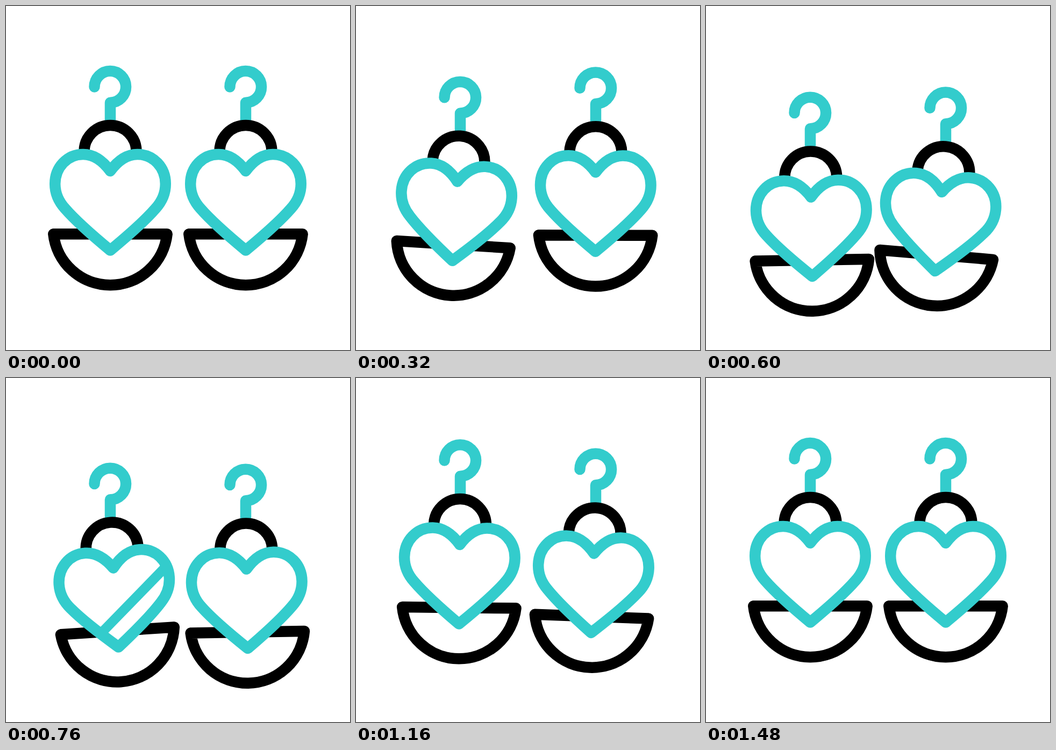
An HTML page that plays this animation: 640x640 px, repeating every 1.6 s.

```html
<!DOCTYPE html>
<html lang="en">
<head>
<meta charset="utf-8">
<title>Swinging earrings</title>
<style>
  html, body { margin: 0; height: 100%; overflow: hidden; background: #fff; }
  svg { display: block; width: 100vw; height: 100vh; }
  path { fill: none; stroke-width: 20.5; stroke-linejoin: round; }
  .teal { stroke: #3cc; }
  .black { stroke: #000; }
</style>
</head>
<body>
<svg id="stage" viewBox="0 0 640 640"></svg>
<script>
const LOOP = 1600, DELAY = 160, SPACING = 252;
const PIVOT = '194 221';
const HEART = `M194 307C180 288 163 276 143.5 276C114 276 91.2 300 91.2 331
  C91.2 349 99 365 110 377C130 400 162 428 194 454.5
  C226 428 258 400 278 377C289 365 296.8 349 296.8 331
  C296.8 300 274 276 244.5 276C225 276 208 288 194 307Z`;

const stage = document.getElementById('stage');
const earring = x => `<g transform="translate(${x})"><g class="drop">
  <path class="teal" stroke-linecap="round" d="M164.5 150.4A29.3 29.3 0 1 1 194 179.7V221"/>
  <g class="swing">
    <path class="black" d="M145.5 270.5A48.5 48.5 0 0 1 242.5 270.5"/>
    <path class="black" d="M88.3 424.2H299.7A106.3 106.3 0 0 1 88.3 424.2Z"/>
    <path d="${HEART}" style="fill:#fff"/>
    <g clip-path="url(#heart)"><rect class="glint" x="-150" y="-9" width="300" height="18" fill="#3cc"/></g>
    <path class="teal" d="${HEART}"/>
  </g></g></g>`;
stage.innerHTML = `<clipPath id="heart"><path d="${HEART}"/></clipPath>` + earring(0) + earring(SPACING);

const smooth = u => u * u * (3 - 2 * u);

// Cubic bezier easing (x1, 0, x2, 1), solved by bisection
const bezier = (x1, x2) => x => {
  let lo = 0, hi = 1;
  for (let i = 0; i < 20; i++) {
    const u = (lo + hi) / 2, v = 1 - u;
    if (3 * x1 * u * v * v + 3 * x2 * u * u * v + u * u * u < x) lo = u; else hi = u;
  }
  return smooth(lo);
};

// Eased value at time t along [time, value] keys
function track(keys, ease, t) {
  const i = keys.findIndex(key => key[0] > t);
  if (i < 1) return keys.at(i)[1];
  const [t0, a] = keys[i - 1], [t1, b] = keys[i];
  return a + (b - a) * ease((t - t0) / (t1 - t0));
}

const dropKeys = [[50, 0], [640, 48.8], [1300, 0]];
const swingKeys = [[135, 0], [420, 5], [720, -4.1], [1015, 2.15], [1240, 0]];
const dropEase = bezier(.555, .45);

const parts = [...stage.querySelectorAll('.drop')].map(drop => ({
  drop, swing: drop.querySelector('.swing'), glint: drop.querySelector('.glint')
}));

function draw() {
  const now = performance.now() % LOOP;
  parts.forEach(({ drop, swing, glint }, i) => {
    const t = now - i * DELAY;
    drop.setAttribute('transform', `translate(0 ${track(dropKeys, dropEase, t)})`);
    swing.setAttribute('transform', `rotate(${track(swingKeys, smooth, t)} ${PIVOT})`);
    glint.setAttribute('transform', `translate(194 360) rotate(-42) translate(0 ${t - 732})`);
  });
  requestAnimationFrame(draw);
}
draw();
</script>
</body>
</html>
```
